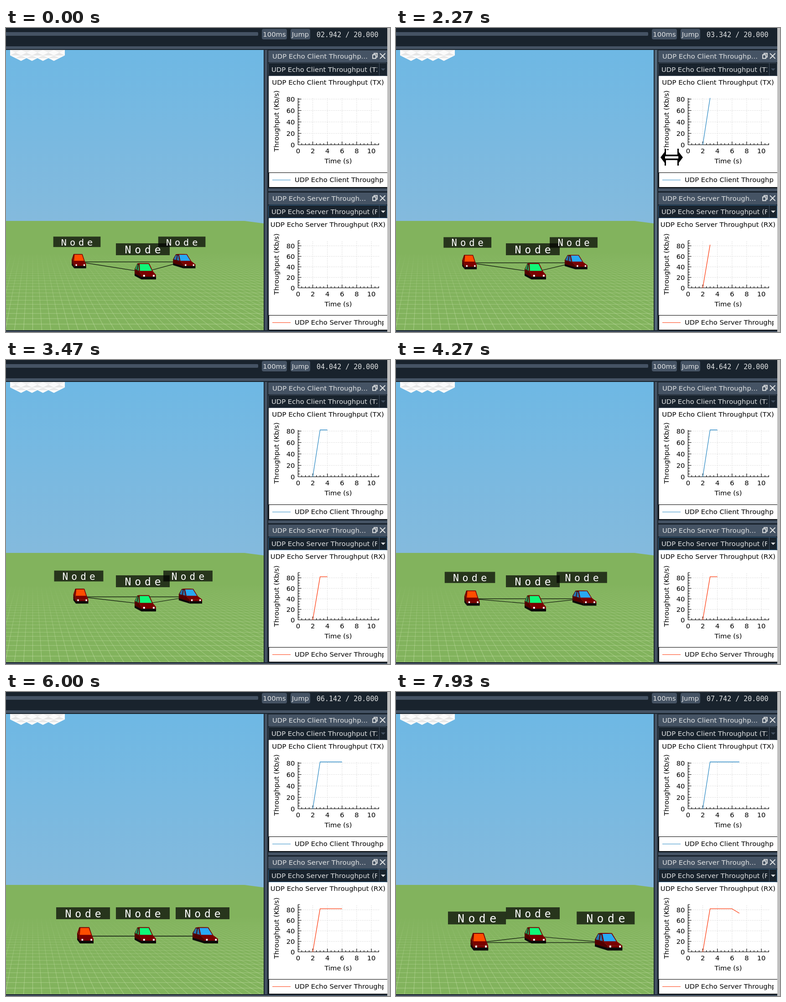
Animation, 842 px wide and 665 px high, one loop 8 s. Source, as an HTML page:

```html
<!DOCTYPE html>
<html lang="en">
<head>
<meta charset="utf-8">
<title>Network simulation playback</title>
<style>
  html, body { margin: 0; width: 100%; height: 100%; overflow: hidden; background: #19232d; }
  svg { display: block; }
  text { font-family: "DejaVu Sans", sans-serif; font-size: 14.8px; white-space: pre; }
  .mono { font-family: "DejaVu Sans Mono", monospace; font-size: 15px; }
  .node { font-family: "DejaVu Sans Mono", monospace; font-size: 23px; letter-spacing: 7.9px; }
</style>
</head>
<body>
<svg id="stage" width="842" height="665" viewBox="0 0 842 665">
  <defs>
    <linearGradient id="sky" x1="0" y1="0" x2="0" y2="1">
      <stop offset="0" stop-color="#6eb8e4"/><stop offset="1" stop-color="#84badd"/>
    </linearGradient>
    <linearGradient id="fade" gradientUnits="userSpaceOnUse" x1="0" y1="490" x2="0" y2="661">
      <stop offset="0" stop-color="#d8ecbc" stop-opacity="0"/>
      <stop offset=".35" stop-color="#d8ecbc" stop-opacity=".2"/>
      <stop offset="1" stop-color="#d8ecbc" stop-opacity=".5"/>
    </linearGradient>
    <clipPath id="view"><rect y="48" width="565" height="613"/></clipPath>
  </defs>
</svg>
<script>
const NS = 'http://www.w3.org/2000/svg';
const stage = document.getElementById('stage');
const DARK = '#19232d', SLATE = '#455364', PALE = '#dfe1e2';

function add(parent, tag, attrs, content) {
  const el = document.createElementNS(NS, tag);
  for (const key in attrs) el.setAttribute(key, attrs[key]);
  if (content !== undefined) el.textContent = content;
  parent.appendChild(el);
  return el;
}
const rect = (p, x, y, width, height, fill, more) =>
  add(p, 'rect', { x, y, width, height, fill, ...more });
const path = (p, d, stroke, more) => add(p, 'path', { d, stroke, fill: 'none', ...more });
const poly = (p, pts, fill) => add(p, 'polygon', { points: pts.join(' '), fill });
const text = (p, x, y, str, fill, more) => add(p, 'text', { x, y, fill, ...more }, str);
const MID = { 'text-anchor': 'middle' };

function clippedText(x, y, width, str, fill) {
  const box = add(stage, 'svg', { x, y: y - 16, width, height: 22, overflow: 'hidden' });
  text(box, 0, 16, str, fill);
}

// ---- 3D view ----
const VX = 58.5, VY = 350.5;
const scene = add(stage, 'g', { 'clip-path': 'url(#view)' });
rect(scene, 0, 48, 565, 380, 'url(#sky)');
poly(scene, [0, 422, 523, 422, 565, 427.5, 565, 661, 0, 661], '#82b35d');

function drawGrid() {
  const depth = 661 - VY, cell = 20, focal = 440;
  let d = '';
  for (let k = -16; k < 70; k++) {
    const x = VX + k * cell;
    const near = 140 / depth;
    d += `M${VX + k * cell * near} ${VY + 140}L${x} 661`;
  }
  for (let k = 0; k < 60; k++) {
    const y = VY + focal * depth / (focal + k * cell * 0.98);
    if (y > 490) d += `M0 ${y}H565`;
  }
  path(scene, d, 'url(#fade)');
}
drawGrid();

function drawCloud() {
  poly(scene, [9, 48, 129, 48, 129, 60, 105, 72, 93, 66, 81, 72, 69, 66, 57, 72, 45, 66, 33, 72, 9, 60], '#fbfbfb');
  for (let k = 0; k < 5; k++) {
    const x = 9 + k * 24;
    poly(scene, [x, 60, x + 12, 54, x + 24, 60], '#e6e6e6');
    poly(scene, [x, 48, x + 24, 48, x + 12, 54], '#eeeeee');
    if (k < 4) poly(scene, [x + 12, 66, x + 24, 60, x + 36, 66], '#e9e9e9');
  }
}
drawCloud();

const links = [0, 1, 2].map(() => add(scene, 'line', { stroke: '#0a0f08', 'stroke-width': 1.2 }));

// A car is a box with a cabin: w across, h up, u from front to rear.
function drawCar(left, right, len, glass, side) {
  const g = add(scene, 'g', {});
  const pt = (w, h, u) => [
    left - len * u + u + w * (right - left) * (1 - 0.12 * u),
    550 - h * (1 - 0.18 * u) - 8 * u
  ];
  const face = (fill, ...pts) => poly(g, pts.map(p => pt(...p)), fill);
  const body = '#7a0000', shade = '#520000', tyre = '#0c0a0a';
  face(tyre, [0, 0, 0], [0, 9, 0], [0, 9, 1], [0, 0, 1]);
  face(shade, [0, 5, 0], [0, 10, 0], [0, 16, .35], [.14, 34, .6], [.14, 33, .88], [0, 18, 1], [0, 6, 1]);
  face(side, [.01, 17, .4], [.12, 31, .62], [.12, 31, .86], [.01, 18, .95]);
  path(g, `M${pt(.01, 17, .68)}L${pt(.13, 32, .72)}`, shade, { 'stroke-width': 1.8 });
  face(body, [.1, 34.5, .6], [.9, 34.5, .6], [.88, 33, .88], [.12, 33, .88]);
  face(body, [0, 10, 0], [1, 10, 0], [1, 16, .35], [.88, 34, .6], [.12, 34, .6], [0, 16, .35]);
  face(glass, [.07, 17, .36], [.93, 17, .36], [.83, 32.5, .59], [.17, 32.5, .59]);
  face(body, [0, 5, 0], [1, 5, 0], [1, 10, 0], [0, 10, 0]);
  face(tyre, [0, 0, 0], [1, 0, 0], [1, 6, 0], [0, 6, 0]);
  for (const w of [.12, .78])
    face('#ffffff', [w, 6, 0], [w + .12, 6, 0], [w + .12, 10, 0], [w, 10, 0]);
  return g;
}

function drawLabel(x) {
  const g = add(scene, 'g', {});
  rect(g, x, 471, 118, 26, '#000', { 'fill-opacity': .7 });
  text(g, x + 19.5, 493, 'Node', '#fff', { class: 'node' });
  return g;
}

const cars = [
  { x: 174, moving: true, parts: [drawCar(162, 192, 7, '#ff4d00', '#c23a10')] },
  { x: 303, moving: false, parts: [drawCar(297, 329, 16, '#10f878', '#16b464')] },
  { x: 432, moving: true, parts: [drawCar(435, 465, 27, '#28a8f4', '#2474b0')] }
];
[110, 241, 372].forEach((x, i) => cars[i].parts.push(drawLabel(x)));

function placeCars(sim) {
  const s = 1 / (1 + 0.0448 * (6.142 - Math.max(sim, 3.042)));
  const at = cars.map(car => {
    const k = car.moving ? s : 1;
    const move = `translate(${VX * (1 - k)} ${VY * (1 - k)}) scale(${k})`;
    car.parts.forEach(part => part.setAttribute('transform', move));
    return [VX + (car.x - VX) * k, VY + (534 - VY) * k];
  });
  links.forEach((line, i) => {
    const a = at[i], b = at[(i + 1) % 3];
    line.setAttribute('x1', a[0]); line.setAttribute('y1', a[1]);
    line.setAttribute('x2', b[0]); line.setAttribute('y2', b[1]);
  });
}

// ---- window frame and toolbar ----
rect(stage, -6, 9, 559, 8, SLATE, { rx: 2 });
rect(stage, 561, 2, 55, 23, SLATE, { rx: 4 });
rect(stage, 624, 2, 43, 23, SLATE, { rx: 4 });
text(stage, 588.5, 19, '100ms', PALE, MID);
text(stage, 645.5, 19, 'Jump', PALE, MID);
const clock = text(stage, 681, 20, '', PALE, { class: 'mono' });
rect(stage, 0, 40, 836, 6, SLATE);
rect(stage, 0, 663, 836, 2, SLATE);
const splitter = rect(stage, 567, 48, 6, 613, SLATE);
rect(stage, 575, 351, 261, 6, SLATE);

// ---- docks with charts ----
const UNIT = 16.06, X0 = 640.5;

function drawDock(o) {
  const { top, name, short, tag } = o;
  rect(stage, 575, top, 261, 26, SLATE);
  text(stage, 584, top + 18, short, PALE);
  path(stage, `M807 ${top + 9}V${top + 6.5}H814V${top + 14.5}H811.5M804 ${top + 9.5}H811V${top + 17.5}H804Z`, PALE, { 'stroke-width': 1.8 });
  path(stage, `M820 ${top + 6.5}L831.5 ${top + 18}M831.5 ${top + 6.5}L820 ${top + 18}`, PALE, { 'stroke-width': 2 });

  rect(stage, 575.5, top + 27.5, 260, 28, DARK, { stroke: o.edge, rx: 3 });
  clippedText(582, top + 47, 232, `${name} (${tag})`, PALE);
  path(stage, `M818.5 ${top + 28}V${top + 55}`, SLATE);
  poly(stage, [822, top + 39.5, 832, top + 39.5, 827, top + 44.5], o.arrow);

  rect(stage, 576, top + 56, 260, o.legend - top - 56, '#fff');
  text(stage, 706, top + 75, `${name} (${tag})`, '#000', MID);
  const y = v => o.zero - v * o.scale;
  let dots = '', ticks = `M${X0} ${y(o.max)}V${o.zero}H818`;
  for (let v = 0; v <= o.max; v += 5) {
    const major = v % 20 === 0;
    ticks += `M${X0} ${y(v)}h${major ? 7 : 4}`;
    if (!major) continue;
    if (v) dots += `M${X0} ${y(v)}H818`;
    text(stage, 633.5, y(v) + 5, v, '#000', { 'text-anchor': 'end' });
  }
  for (let n = 0; n <= 22; n++) {
    const x = X0 + n / 2 * UNIT, major = n % 4 === 0;
    ticks += `M${x} ${o.zero}v${major ? -7 : -3.5}`;
    if (!major) continue;
    if (n) dots += `M${x} ${o.zero}V${y(o.max)}`;
    text(stage, x, o.zero + 18.5, n / 2, '#000', MID);
  }
  path(stage, dots, '#c4c4c4', { 'stroke-dasharray': '1.3 2.7' });
  path(stage, ticks, '#000', { 'stroke-width': 1.2 });
  text(stage, 728.5, o.zero + 40.5, 'Time (s)', '#000', MID);
  text(stage, 0, 0, 'Throughput (Kb/s)', '#000',
    { ...MID, transform: `translate(598 ${o.zero - 52}) rotate(-90)` });

  rect(stage, 576.5, o.legend + .5, 260, 32, '#fff', { stroke: '#000' });
  rect(stage, 836, o.legend, 1, 33, '#c0c0c0');
  path(stage, `M584 ${o.legend + 16.5}H624`, o.color);
  clippedText(633, o.legend + 21, 195, `${name} (${tag})`, '#000');
  const curve = path(stage, '', o.color, { 'stroke-width': 1.3, 'stroke-linejoin': 'round' });

  return second => {
    let d = '';
    for (let n = 2; n <= second && second > 2; n++) {
      const value = n === 2 ? 0 : n === 7 ? o.last : 82;
      d += `${d ? 'L' : 'M'}${X0 + n * UNIT} ${y(value)}`;
    }
    curve.setAttribute('d', d);
  };
}

const charts = [
  drawDock({ top: 49, name: 'UDP Echo Client Throughput', short: 'UDP Echo Client Throughp...', tag: 'TX',
    edge: SLATE, arrow: SLATE, zero: 255.5, scale: 1.25, max: 82, legend: 316, color: '#308cc6', last: 82 }),
  drawDock({ top: 360, name: 'UDP Echo Server Throughput', short: 'UDP Echo Server Through...', tag: 'RX',
    edge: '#346792', arrow: PALE, zero: 568.5, scale: 1.15, max: 90, legend: 628, color: '#ff4116', last: 73.5 })
];
rect(stage, 836, 0, 6, 665, '#c0c0c0');

// ---- resize pointer ----
const pointer = add(stage, 'g', {});
const arrow = 'M580 283L589 271V264H592V277H617V264H620V271L629 283L620 295V301H617V289H592V301H589V295Z';
path(pointer, arrow, '#fff', { 'stroke-width': 3 });
path(pointer, arrow, 'none', { fill: '#000' });
rect(pointer, 590, 280.5, 29, 5, '#fff');

// ---- playback: ticks at which the clock gains 0.1 s, from 3.042 on ----
const LOOP = 8000, TICK = 200 / 3;
const steps = [25, 28, 31, 34, 36, 39, 41, 44, 47, 49, 52, 53, 55, 58, 60, 62,
  64, 65, 67, 70, 72, 75, 77, 78, 80, 82, 82, 83, 85, 86, 88, 90, 92, 93, 96, 98,
  99, 101, 103, 104, 106, 110, 112, 113, 115, 116, 118, 119];

function render(ms) {
  const tick = Math.floor((ms + 4) / TICK);
  const tenths = 29 + steps.filter(s => s <= tick).length;
  const sim = tenths / 10 + 0.042;
  clock.textContent = `0${sim.toFixed(3)} / 20.000`;
  placeCars(sim);
  charts.forEach(draw => draw(Math.floor(tenths / 10)));
  pointer.setAttribute('visibility', tick >= 33 && tick <= 37 ? 'visible' : 'hidden');
  splitter.setAttribute('fill', tick >= 32 && tick <= 39 ? '#54687a' : SLATE);
}

const start = performance.now();
let shown = -1;
function frame() {
  const ms = (performance.now() - start) % LOOP;
  const tick = Math.floor((ms + 4) / TICK);
  if (tick !== shown) render(ms);
  shown = tick;
  requestAnimationFrame(frame);
}
frame();
</script>
</body>
</html>
```
